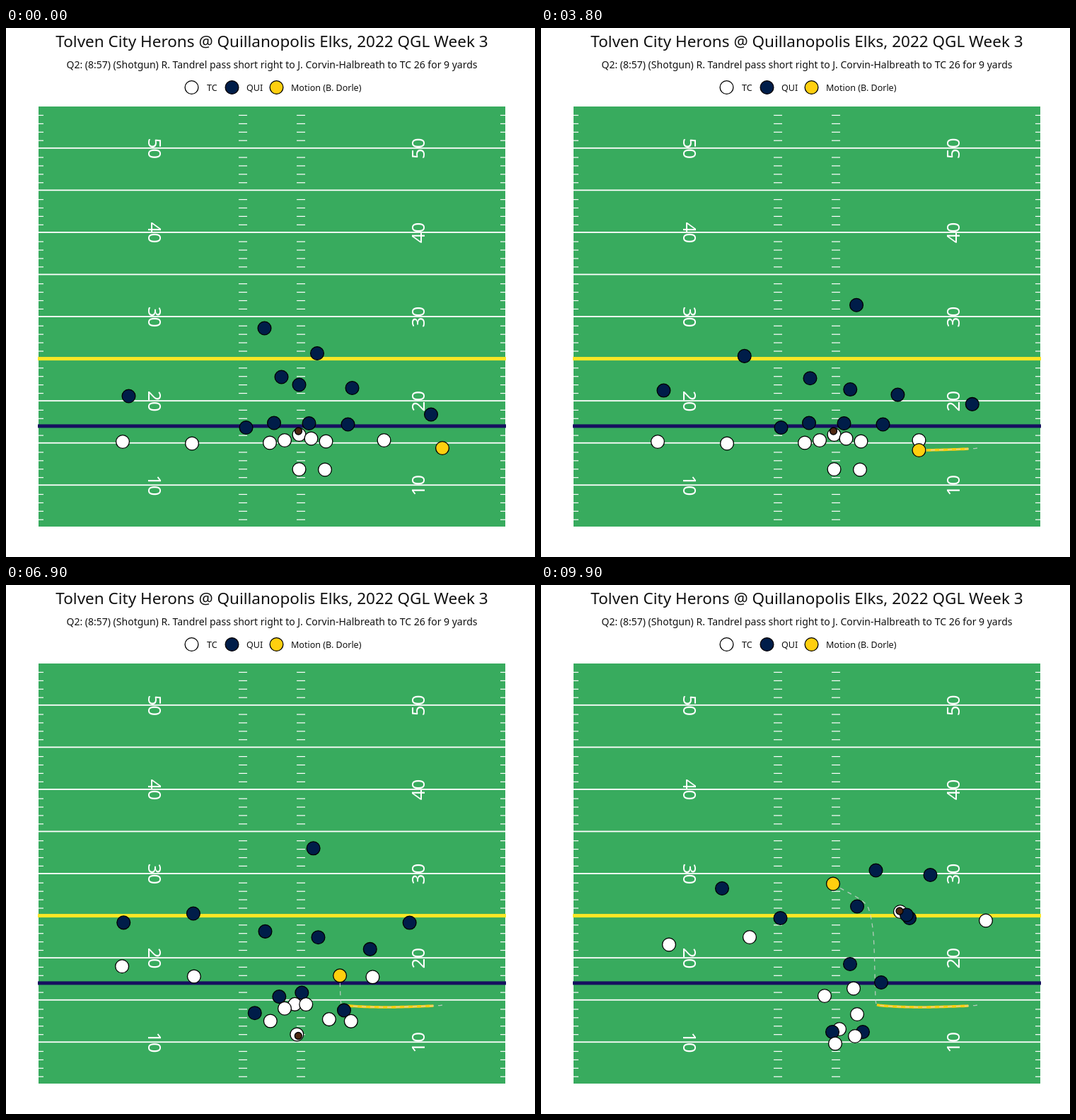
Write an HTML page with a canvas that moves like this. It is 748x748 px and loops after 10 s.

```html
<!DOCTYPE html>
<html lang="en">
<head>
<meta charset="utf-8">
<title>Play animation</title>
<style>
html, body { margin: 0; width: 100%; height: 100%; overflow: hidden; background: #fff; }
canvas { display: block; }
</style>
</head>
<body>
<canvas id="stage" width="748" height="748"></canvas>
<script>
const ctx = document.getElementById('stage').getContext('2d');
const FONT = '"Noto Sans", "Open Sans", sans-serif';
const HOME = '#fff', AWAY = '#001d49', MOTION = '#ffcf0f', BALL = '#4d2711';

// The play advances in steps of 100 ms; all moments below are in steps
const STEP = 100, STEPS = 100;
const SHIFT = 17, MOTION_START = 22, RESET = 29, SNAP = 59, CATCH = 63;
const RUSH = 77, THROW = 85, RECEIVE = 93, END = 99;

const yardY = yard => 765.4 - 11.912 * yard;
const clamp = u => Math.max(0, Math.min(1, u));

// Monotone cubic through values v at moments t, so players ease in and out of stops
function curve(t, v, now) {
  const last = t.length - 1;
  const slope = j => (v[j + 1] - v[j]) / (t[j + 1] - t[j]);
  const tangent = j => {
    const a = slope(Math.max(j - 1, 0)), b = slope(Math.min(j, last - 1));
    return a * b > 0 ? 2 * a * b / (a + b) : 0;
  };
  let i = 0;
  while (i < last - 1 && now > t[i + 1]) i++;
  const span = t[i + 1] - t[i], u = (now - t[i]) / span, w = 1 - u;
  return w * w * (1 + 2 * u) * v[i] + u * u * (3 - 2 * u) * v[i + 1]
    + span * u * w * (w * tangent(i) - u * tangent(i + 1));
}

const movers = [];
function add(fill, at) {
  movers.push({ fill, at });
  return at;
}

function player(fill, times, ...points) {
  const xs = points.map(p => p[0]), ys = points.map(p => p[1]);
  return add(fill, now => [curve(times, xs, now), curve(times, ys, now)]);
}

// Set until the snap, then one point at the rush and one at the end
const setPlayer = (fill, start, ...rest) => player(fill, [0, SNAP, RUSH, END], start, start, ...rest);
// Shifts before the snap, then drops into coverage
const cover = (...points) => player(AWAY, [0, SHIFT, SNAP + 2, RUSH, END], ...points);
// As above, with a second shift
const deep = (...points) => player(AWAY, [0, SHIFT, RESET, SNAP + 2, RUSH, END], ...points);

// Drawing order is back to front
setPlayer(HOME, [373, 586.5], [375.5, 638], [422, 628]);
const receiver = setPlayer(HOME, [534.5, 583], [507, 521], [508, 462]);
setPlayer(HOME, [165, 585], [163.5, 506.5], [181, 508.5]);
setPlayer(HOME, [263, 587.5], [270.5, 522], [295, 498]);

deep([365.5, 424.5], [428, 410.5], [447, 394], [439, 387.5], [431.5, 358.5], [473.5, 403.5]);
deep([440, 460], [350, 457], [304, 460.5], [264.5, 470.5], [266, 458.5], [338.5, 471]);
deep([601, 546.5], [614.5, 545], [617.5, 539], [573, 503], [568.5, 449.5], [550.5, 410]);
cover([173.5, 520.5], [173, 517.5], [174, 503], [158.5, 448.5], [256, 429]);
cover([389.5, 493.5], [380, 496.5], [381, 492], [352, 486], [447, 454.5]);
cover([489.5, 509], [507, 515], [501.5, 520.5], [528, 504.5], [521, 471]);
cover([414.5, 504.5], [436, 510], [438.5, 511.5], [448, 481], [517, 466.5]);

setPlayer(AWAY, [339.5, 565], [368, 634], [412, 632]);
setPlayer(AWAY, [379, 558.5], [397, 599], [437, 536]);
setPlayer(AWAY, [428.5, 559], [411, 589], [481, 562]);
setPlayer(AWAY, [483.5, 560.5], [471, 631], [455, 632]);

const center = setPlayer(HOME, [414.5, 575], [404, 606], [447, 607]);
setPlayer(HOME, [431.5, 580.5], [419, 602], [442, 570.5]);
setPlayer(HOME, [394, 583], [394, 610], [401, 581]);
setPlayer(HOME, [452.5, 584.5], [460, 636], [444, 638]);
setPlayer(HOME, [451, 624.5], [533, 603], [629, 474.5]);
const passer = player(HOME, [0, SNAP, RUSH, THROW, END],
  [414.5, 624], [414.5, 624], [409, 649.5], [411, 660], [416, 648.5]);
const runner = player(MOTION, [0, SHIFT, 37, 57, 61, RUSH, 88, END],
  [617, 594], [614, 594.5], [538, 597], [475, 593.5], [473.5, 590], [470.5, 502], [463, 457], [413, 422.5]);

// The ball goes from centre to passer to receiver
add(BALL, now => {
  const held = [center(now), passer(now), receiver(now)];
  const snap = clamp((now - SNAP) / (CATCH - SNAP));
  const pass = clamp((now - THROW) / (RECEIVE - THROW));
  const mix = (a, b, c) => (a + (b - a) * snap) * (1 - pass) + c * pass;
  return [
    mix(held[0][0] - 1, held[1][0] + 2, held[2][0] - 1),
    mix(held[0][1] - 5, held[1][1] + 2, held[2][1] - 1)
  ];
});

function dot(x, y, fill) {
  ctx.beginPath();
  ctx.arc(x, y, fill === BALL ? 5 : 9.4, 0, 7);
  ctx.fillStyle = fill;
  ctx.fill();
  ctx.strokeStyle = '#000';
  ctx.lineWidth = 1.3;
  ctx.stroke();
}

function row(x, y, length, width, colour = '#fff') {
  ctx.fillStyle = colour;
  ctx.fillRect(x, y - width / 2, length, width);
}

function label(text, x, y, size, align = 'center') {
  ctx.font = `${size}px ${FONT}`;
  ctx.textAlign = align;
  ctx.fillText(text, x, y);
}

function yardLabel(yard, x, turn) {
  ctx.save();
  ctx.translate(x, yardY(yard) + 0.5);
  ctx.rotate(turn * Math.PI / 2);
  ctx.fillStyle = '#fff';
  label(yard, 0, 0, 26);
  ctx.restore();
}

function legend(x, fill, textX, text) {
  dot(x, 84, fill);
  ctx.fillStyle = '#111';
  label(text, textX, 89, 12.5, 'left');
}

function drawHeader() {
  ctx.fillStyle = '#111';
  label('Tolven City Herons @ Quillanopolis Elks, 2022 QGL Week 3', 376, 27, 22.5);
  label('Q2: (8:57) (Shotgun) R. Tandrel pass short right to J. Corvin-Halbreath to TC 26 for 9 yards', 376, 57, 14);
  legend(262.5, HOME, 284, 'TC');
  legend(319.5, AWAY, 340, 'QUI');
  legend(382.5, MOTION, 403, 'Motion (B. Dorle)');
}

function drawField() {
  ctx.fillStyle = '#38ab5e';
  ctx.fillRect(46, 111, 660, 594);
  for (let yard = 6; yard < 55; yard++) {
    const y = yardY(yard);
    if (yard % 5 === 0) {
      row(46, y, 660, 1.8);
    } else {
      for (const x of [46, 699]) row(x, y + 1.3, 7, 1.2);
      for (const x of [329, 411]) row(x, y + 1.3, 12, 1.2);
    }
  }
  for (let yard = 10; yard <= 50; yard += 10) {
    yardLabel(yard, 201, 1);
    yardLabel(yard, 592, -1);
  }
  row(45, yardY(17), 662, 5, '#16105f');
  row(45, yardY(25), 662, 5, '#fde725');
}

function trail(from, to, colour, width, dash) {
  ctx.beginPath();
  for (let t = from; t <= to; t++) ctx.lineTo(...runner(t));
  ctx.strokeStyle = colour;
  ctx.lineWidth = width;
  ctx.setLineDash(dash);
  ctx.stroke();
  ctx.setLineDash([]);
}

function draw(ms) {
  const now = Math.floor(ms / STEP) % STEPS;
  ctx.fillStyle = '#fff';
  ctx.fillRect(0, 0, 748, 748);
  drawHeader();
  drawField();
  trail(MOTION_START, Math.min(now, SNAP - 2), MOTION, 3.6, []);
  trail(0, now, 'rgba(211, 211, 211, .8)', 1.3, [6, 6]);
  for (const { fill, at } of movers) dot(...at(now), fill);
}

const start = performance.now();
function tick() {
  draw(performance.now() - start);
  requestAnimationFrame(tick);
}
tick();
</script>
</body>
</html>
```
